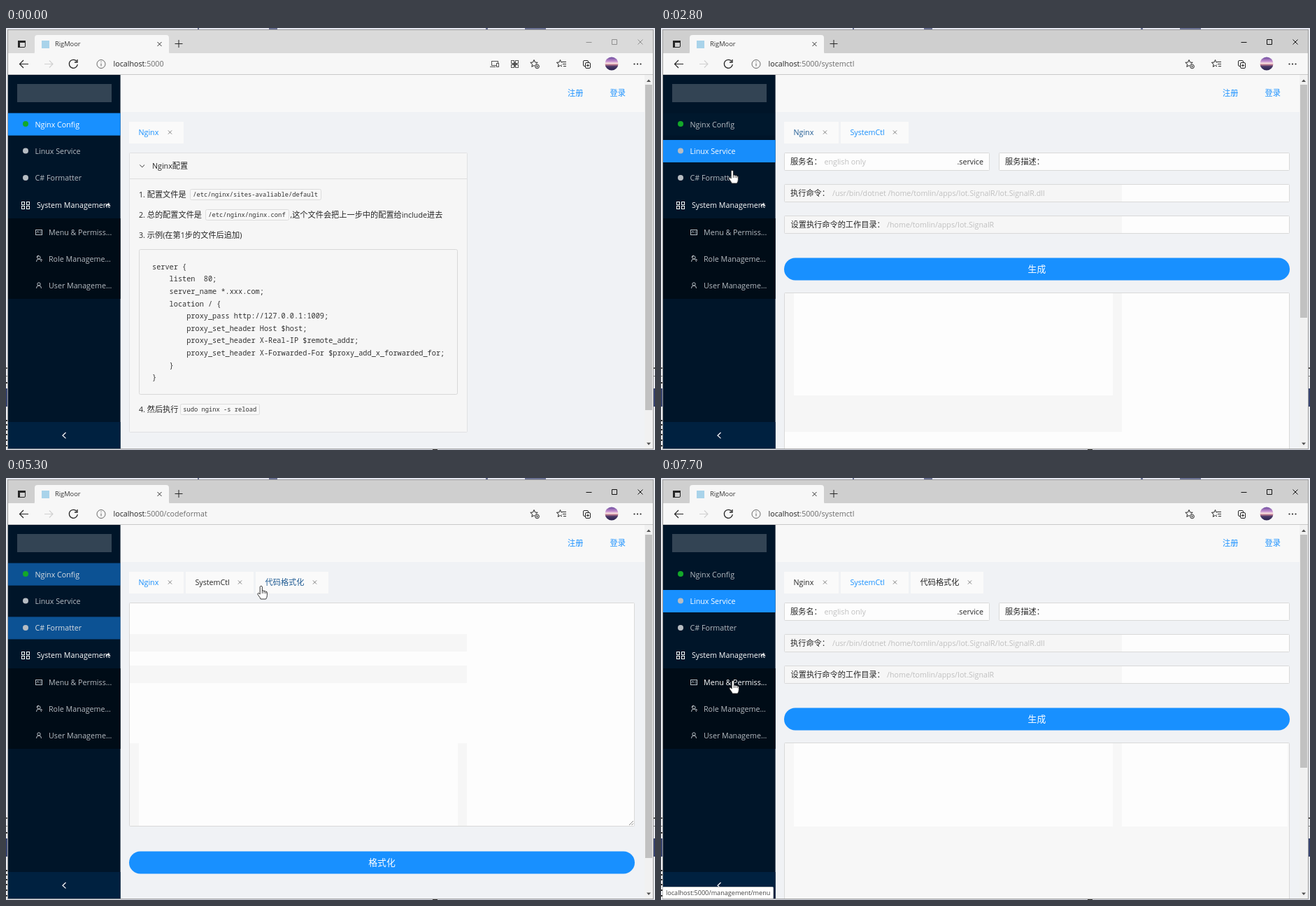
Animation, 928 px wide and 603 px high, one loop 8 s. Source, as an HTML page:

```html
<!DOCTYPE html>
<html lang="zh">
<head>
<meta charset="utf-8">
<title>RigMoor</title>
<style>
html, body { margin: 0; width: 100%; height: 100%; overflow: hidden; background: #e9ebf0; }
svg { display: block; width: 928px; height: 603px; }
text { font-family: 'Open Sans', 'Noto Sans CJK SC', 'Noto Sans CJK', sans-serif; }
.mono { font-family: 'Noto Sans Mono', monospace; }
</style>
</head>
<body>
<svg id="stage" viewBox="0 0 928 603" xmlns="http://www.w3.org/2000/svg"></svg>
<script>
const LOOP = 8000, STEP = 100, FADE = 300;
const BLUE = [24, 144, 255], INK = [38, 38, 38], DIM = [182, 188, 194], WHITE = [255, 255, 255];
const BLUE_HEX = '#1890ff', INK_HEX = '#262626', DIM_HEX = '#b6bcc2';

// --- drawing helpers ---
const esc = s => s.replace(/&/g, '&amp;').replace(/</g, '&lt;');
const rect = (x, y, w, h, fill, extra = '') =>
  `<rect x="${x}" y="${y}" width="${w}" height="${h}" fill="${fill}" ${extra}/>`;
const frame = (x, y, w, h, fill, stroke = '#d9d9d9', r = 1) =>
  rect(x + .5, y + .5, w - 1, h - 1, fill, `stroke="${stroke}" rx="${r}"`);
const line = (d, color = INK_HEX, w = 1, extra = '') =>
  `<path d="${d}" fill="none" stroke="${color}" stroke-width="${w}" ${extra}/>`;
const disc = (x, y, r, fill) => `<circle cx="${x}" cy="${y}" r="${r}" fill="${fill}"/>`;
const ring = (x, y, r, color) => `<circle cx="${x}" cy="${y}" r="${r}" fill="none" stroke="${color}"/>`;
const group = (id, body, extra = '') => `<g id="${id}" ${extra}>${body}</g>`;
// Text is placed by its vertical middle on a whole-pixel baseline; Chinese runs are set slightly larger.
const text = (x, cy, s, fill = INK_HEX, size = 10.7, extra = '') => {
  const body = esc(s).replace(/[\u3000-\u9fff\uff00-\uffef]+/g,
    m => `<tspan font-size="${(size * 1.047).toFixed(2)}">${m}</tspan>`);
  return `<text x="${x}" y="${Math.round(cy + size * .365)}" font-size="${size}" fill="${fill}" ${extra}>${body}</text>`;
};
const mono = (x, cy, s, size) => text(x, cy, s, '#333', size, 'class="mono"');
const cross = (x, y, r, color, w = 1) =>
  line(`M${x - r} ${y - r}l${2 * r} ${2 * r}m0 ${-2 * r}l${-2 * r} ${2 * r}`, color, w);

const star = (x, y, r) => {
  let d = '';
  for (let i = 0; i < 10; i++) {
    const a = -Math.PI / 2 + i * Math.PI / 5, q = i % 2 ? r * .45 : r;
    d += (i ? 'L' : 'M') + (x + q * Math.cos(a)).toFixed(1) + ' ' + (y + q * Math.sin(a)).toFixed(1);
  }
  return line(d + 'Z', INK_HEX, 1, 'stroke-linejoin="round"');
};

// --- browser window ---
function desktop() {
  return rect(0, 0, 928, 603, '#e9ebf0') + rect(0, 0, 928, 2, '#e4e6f0') +
    [[274, 2], [376, 12], [686, 3], [742, 30]].map(([x, w]) => rect(x, 0, w, 2, '#6c7395')).join('') +
    [0, 926].map(x => rect(x, 515, 3, 26, '#3a4672') + rect(x, 485, 3, 2, '#555') + rect(x, 497, 3, 1, '#777')).join('') +
    [506, 560, 566, 573, 580, 588, 596].map(y => rect(0, y, 2, 2, '#333')).join('');
}

function chrome() {
  const collect = rect(825.5, 46.5, 7, 8, 'none', `stroke="${INK_HEX}" rx="1.5"`) +
    rect(828.5, 49.5, 7, 8, '#f7f7f7', `stroke="${INK_HEX}" rx="1.5"`) + line('M830 53.5h4m-2 -2v4');
  return rect(2, 2, 924, 600, '#9c9c9c') + rect(3, 3, 922, 34, '#cfcfcf', 'id="titleBar"') +
    rect(3, 36, 922, 31, '#f7f7f7') + '<path d="M38 37Q41 37 41 34V14Q41 10 45 10H229Q233 10 233 14V34Q233 37 236 37Z" fill="#f7f7f7"/>' +
    rect(17.5, 18.5, 10, 9, 'none', `stroke="${INK_HEX}" rx="1.5"`) + rect(17, 18, 11, 3, INK_HEX) + rect(17, 18, 3, 10, INK_HEX) +
    rect(51, 18, 11, 11, '#a9d3ea') + text(70, 23, 'RigMoor', '#333', 9.3) + cross(219.5, 23, 3, '#333') +
    line('M241.5 22.5h11m-5.5 -5.5v11') +
    line('M32 51.5H19.5m5.5 -5.5l-5.5 5.5l5.5 5.5', INK_HEX, 1.2) +
    line('M55 51.5h12m-5 -5l5 5l-5 5', '#d0d0d0', 1.1) +
    line('M101 47.5a6 6 0 1 0 1.3 4.5M102 45v4h-4', INK_HEX, 1.3) +
    ring(136, 51.5, 6, '#666') + line('M136 50.5v4M136 47.7v1.3', '#666') +
    star(755, 51, 5.5) + disc(759.5, 55, 3.5, '#f7f7f7') + ring(759.5, 55, 2.8, INK_HEX) + line('M758 55h3m-1.5 -1.5v3', INK_HEX, .7) +
    star(792.5, 51, 5.5) + rect(795, 47, 7, 9, '#f7f7f7') + line('M795 48.5h6m-5 3h5m-4 3h4') + collect +
    '<circle cx="866" cy="51" r="9.5" fill="url(#sky)"/>' +
    [898.5, 903, 907.5].map(x => disc(x, 51.5, 1.1, INK_HEX)).join('') +
    group('sideIcons', rect(694.5, 47.5, 9, 6, 'none', 'stroke="#555"') + line('M692 55.5h8', '#555') +
      rect(701.5, 50.5, 3, 5, '#f7f7f7', 'stroke="#555"') +
      [722, 728].map(x => [46, 52].map(y => rect(x + .5, y + .5, 4, 4, 'none', 'stroke="#555"')).join('')).join('') + line('M724 51.5h7m-3.5 -3v7', '#555')) +
    group('winButtons', '<path d="M829.5 20.5h8M866.5 16.5h7v7h-7ZM903.5 16.5l7 7m0 -7l-7 7" fill="none"/>') +
    '<text x="153.5" y="55" font-size="10.7" fill="#222">localhost<tspan fill="#6b6b6b" id="path"></tspan></text>' +
    rect(3, 66, 922, 1, '#c9c9c9');
}

const MENU = [['Nginx Config', 121.6], ['Linux Service', 160], ['C# Formatter', 198.4]];
const SUB = ['Menu & Permiss...', 'Role Manageme...', 'User Manageme...'];

function sidebar() {
  const items = MENU.map(([label, y], i) =>
    rect(3, y, 160.6, 32, BLUE_HEX, `id="bg${i}" opacity="0"`) +
    disc(28, y + 15.5, 4, i ? DIM_HEX : '#13a829') +
    text(41.5, y + 16, label, DIM_HEX, 10.7, `id="item${i}"`)).join('');
  const person = (y, role) => ring(47, y - 2, 2.2, DIM_HEX) + line(`M43.5 ${y + 4}q0 -4 3.5 -4t3.5 4`, DIM_HEX) +
    (role ? line(`M44 ${y - 2}q0 -3 3 -3M50 ${y}l2 2`, DIM_HEX) : '');
  return rect(3, 67, 160.6, 535, '#001529') + rect(16, 80, 135, 26, '#334454') + items +
    rect(3, 272, 160.6, 115, '#000c17') +
    [22.5, 29.5].map(x => [248.5, 254.5].map(y => rect(x, y, 4, 4, 'none', 'stroke="#fff"')).join('')).join('') +
    text(44, 253, 'System Management', '#fff') + line('M142.5 254.5l3.3 -2.8l3.3 2.8', '#fff', 1.3) +
    rect(42.5, 288.5, 9, 7, 'none', `stroke="${DIM_HEX}"`) + line('M44 293l1.5 -3l1.5 3M48.5 291h2m-2 2h2', DIM_HEX, .8) +
    person(330, true) + person(368, false) +
    SUB.map((s, i) => text(61, 291.7 + i * 38.4, s, DIM_HEX, 10.7, `id="sub${i}"`)).join('') +
    rect(3, 563, 160.6, 38, '#002140') + line('M85.5 578l-4.5 4.2l4.5 4.2', '#fff', 1.2);
}

function main() {
  return rect(163, 67, 750, 534, '#f0f2f5') + rect(163, 67, 750, 53, '#f8f8f8') +
    text(803, 93, '注册', BLUE_HEX) + text(863.5, 93, '登录', BLUE_HEX) +
    rect(913, 67, 12, 534, '#f1f1f1') + rect(914, 81, 10, 465, '#c1c1c1', 'id="thumb"') +
    '<path d="M916 77l3 -3.5l3 3.5ZM916 592.5l3 3.5l3 -3.5Z" fill="#505050"/>';
}

const TABS = [['Nginx', 176, 78, 0], ['SystemCtl', 257, 97, 2550], ['代码格式化', 357, 104, 3200]];
const tabs = () => TABS.map(([s, x, w], i) => group('tab' + i,
  rect(x, 134, w, 31, '#fafafa') + text(x + 13.5, 149, s, INK_HEX, 10.7, `id="label${i}"`) +
  cross(x + w - 19.5, 149, 2.6, '#777', .9))).join('');

// --- pages ---
const CODE = [[0, 'server {'], [1, 'listen  80;'], [1, 'server_name *.xxx.com;'], [1, 'location / {'],
  [2, 'proxy_pass http://127.0.0.1:1009;'], [2, 'proxy_set_header Host $host;'],
  [2, 'proxy_set_header X-Real-IP $remote_addr;'],
  [2, 'proxy_set_header X-Forwarded-For $proxy_add_x_forwarded_for;'], [1, '}'], [0, '}']];

function nginxPage() {
  const chip = (x, y, w, s) => frame(x, y, w, 16, '#f8f8f8', '#dcdcdc', 2) + mono(x + 4.2, y + 8.2, s, 8.78);
  return frame(176, 178, 484, 400, '#f6f6f6', '#e0e1e3') + line('M177 215.5h482', '#dedede') +
    line('M191.3 195.5l3.4 3.4l3.4 -3.4', '#333') + text(209, 197, 'Nginx配置') +
    text(190, 238, '1. 配置文件是') + chip(263, 230, 188, '/etc/nginx/sites-avaliable/default') +
    text(190, 267, '2. 总的配置文件是') + chip(285, 259, 120, '/etc/nginx/nginx.conf') +
    text(406.5, 267, ',这个文件会把上一步中的配置给include进去') +
    text(190, 296, '3. 示例(在第1步的文件后追加)') + frame(190, 316, 456, 208, '#f6f6f6', '#d8d8d8', 2) +
    CODE.map(([n, s], i) => mono(209 + n * 24.6, 341 + i * 17.6, s, 10.26).replace('<text', '<text xml:space="preserve"')).join('') +
    text(190, 545, '4. 然后执行') + chip(249, 537, 114, 'sudo nginx -s reload');
}

const button = (y, s) => rect(176, y, 723, 32, BLUE_HEX, 'rx="16"') + text(537.5, y + 16, s, '#fff', 12.3, 'text-anchor="middle"');

function servicePage() {
  const hint = '#bfbfbf', tint = y => rect(177, y, 482, 24, '#f6f6f6');
  return frame(176, 178, 294, 26, '#fdfdfd') + text(185, 191, '服务名：') + text(233.5, 191, 'english only', hint) +
    text(423.5, 191, '.service') + frame(483, 178, 416, 26, '#fdfdfd') + text(492, 191, '服务描述：') +
    frame(176, 223, 723, 26, '#fdfdfd') + tint(224) + text(185, 236, '执行命令：') +
    text(245, 236, '/usr/bin/dotnet /home/tomlin/apps/Iot.SignalR/Iot.SignalR.dll', hint) +
    frame(176, 268, 723, 26, '#fdfdfd') + tint(269) + text(185.5, 281, '设置执行命令的工作目录：') +
    text(323, 281, '/home/tomlin/apps/Iot.SignalR', hint) + button(328.5, '生成') +
    frame(176, 378, 723, 240, '#fdfdfd') +
    group('shadeA', rect(177, 379, 482, 198, '#f6f6f6') + rect(190, 379, 456, 146, '#fdfdfd')) +
    group('shadeB', rect(177, 379, 721, 230, '#f7f7f7') + rect(190, 379, 456, 119, '#fdfdfd') + rect(659, 379, 237, 119, '#fdfdfd'));
}

function formatPage() {
  return frame(176, 178, 723, 320, '#fdfdfd') +
    rect(177, 223, 482, 25, '#f6f6f6') + rect(177, 268, 482, 25, '#f6f6f6') +
    rect(177, 379, 13, 118, '#f6f6f6') + rect(646, 379, 13, 118, '#f6f6f6') +
    line('M891 496l6 -6m-2.5 6l2.5 -2.5', '#888') + button(533.5, '格式化');
}

const HAND = '<path d="M-1.8 9V.8Q-1.8 -.6 -.2 -.6Q1.4 -.6 1.4 .8V6.2Q2.8 5.4 4 6.6Q5.5 6 6.4 7.3Q8.4 6.9 8.4 9V12.4Q8.4 15.5 6.6 18H-.8Q-1.8 15.4 -4.4 12.4Q-5.8 10.4 -4.6 9.6Q-3.2 9 -1.8 11Z" fill="#fff" stroke="#222" stroke-width=".9"/>' +
  line('M1.4 6v4M4 6.8v3.2M6.4 7.5v2.7', '#222', .8);
const ARROW = '<path d="M0 0V15L3.4 11.8L5.7 17L8 16L5.8 11H10.5Z" fill="#fff" stroke="#222" stroke-width=".9"/>';

const stage = document.getElementById('stage');
stage.innerHTML = '<defs><linearGradient id="sky" x2="0" y2="1"><stop stop-color="#6a4a9c"/>' +
  '<stop offset=".32" stop-color="#c58fd0"/><stop offset=".48" stop-color="#fbe3e0"/><stop offset=".58" stop-color="#b9788f"/>' +
  '<stop offset=".7" stop-color="#4a3868"/><stop offset="1" stop-color="#2b2350"/></linearGradient></defs>' +
  desktop() + chrome() + main() + sidebar() + tabs() +
  group('page0', nginxPage()) + group('page1', servicePage()) + group('page2', formatPage()) +
  group('status', rect(2.5, 584.5, 158, 17, '#fff', 'id="statusBox" stroke="#c4c4c4" rx="1"') + text(7, 593, '', '#444', 9.1, 'id="statusText"')) +
  rect(2, 601, 924, 1, '#9c9c9c') + rect(0, 602, 928, 1, '#d4d7e2') + rect(610, 602, 7, 1, '#333') +
  group('hand', HAND) + group('arrow', ARROW);

const el = {};
stage.querySelectorAll('[id]').forEach(n => el[n.id] = n);

// --- timeline ---
const PAGES = [[0, 0], [2550, 1], [3200, 2], [4100, 1], [4550, 0], [5150, 2], [5700, 1]];
const PATHS = [[0, ''], [1200, '/systemctl'], [2900, '/codeformat'], [4100, '/systemctl'], [4550, ''], [5150, '/codeformat'], [5700, '/systemctl']];
const STATUS = [[0, ''], [1000, 'systemctl'], [1200, ''], [7700, 'management/menu']];
const MOVES = [[300, 860, 43], [600, 520, 150], [900, 150, 190], [1100, 93, 177], [2500, 93, 177], [2800, 102, 204],
  [3000, 100, 211], [3400, 100, 211], [3900, 290, 147], [4100, 290, 147], [4300, 236, 152], [4450, 208, 150],
  [4800, 208, 150], [5100, 365, 155], [5300, 365, 155], [5600, 298, 150], [5800, 298, 150], [6500, 98, 254],
  [6800, 98, 254], [7500, 103, 290]];
const THUMB_END = [546, 414, 543];
const ACTIVE_AT = 1200;

const last = (table, t) => table.reduce((k, row, i) => row[0] <= t ? i : k, 0);
const ease = p => { p = Math.min(1, Math.max(0, p)); return p < .5 ? 4 * p ** 3 : 1 - (2 - 2 * p) ** 3 / 2; };
const mix = (a, b, p) => `rgb(${a.map((v, i) => Math.round(v + (b[i] - v) * p))})`;
const show = (node, on) => node.setAttribute('visibility', on ? 'visible' : 'hidden');

function pointer(t) {
  const i = last(MOVES, t), a = MOVES[i], b = MOVES[i + 1] || a;
  let p = b === a ? 0 : (t - a[0]) / (b[0] - a[0]);
  p = p * p * (3 - 2 * p);
  return [a[1] + (b[1] - a[1]) * p, a[2] + (b[2] - a[2]) * p];
}

function render(now) {
  const t = Math.floor(now % LOOP / STEP) * STEP;
  const k = last(PAGES, t), [since, cur] = PAGES[k], prev = k ? PAGES[k - 1][1] : -1;
  const fadeIn = k ? ease((t - since) / FADE) : 1;
  const fadeOut = 1 - ease((t - since - 100) / FADE);
  const [x, y] = pointer(t), seen = t >= 300;

  MENU.forEach(([, top], i) => {
    const on = i === cur ? fadeIn : i === prev ? 1 - fadeIn : 0;
    const hover = seen && x < 163 && y >= top + 8 && y < top + 32;
    el['bg' + i].setAttribute('opacity', on);
    el['item' + i].setAttribute('fill', mix(DIM, WHITE, hover ? 1 : on));
  });
  TABS.forEach(([, , , born], i) => {
    const on = i === cur ? fadeIn : i === prev ? fadeOut : 0;
    show(el['tab' + i], t >= born);
    el['label' + i].setAttribute('fill', mix(INK, BLUE, on));
  });
  for (let i = 0; i < 3; i++) show(el['page' + i], i === cur);
  show(el.shadeA, cur === 1 && t < 3200);
  show(el.shadeB, cur === 1 && t >= 3200);
  el.thumb.setAttribute('height', THUMB_END[cur] - 81);
  el.sub0.setAttribute('fill', t >= 7400 ? '#fff' : DIM_HEX);

  const active = t >= ACTIVE_AT;
  el.path.textContent = ':5000' + PATHS[last(PATHS, t)][1];
  show(el.sideIcons, !active);
  el.titleBar.setAttribute('fill', active ? '#cfcfcf' : '#dadada');
  el.winButtons.setAttribute('stroke', active ? '#111' : '#8f8f8f');

  const tip = STATUS[last(STATUS, t)][1];
  show(el.status, tip);
  el.statusText.textContent = 'localhost:5000/' + tip;
  el.statusBox.setAttribute('width', tip === 'systemctl' ? 114 : 158);

  const link = x < 163 || (y > 133 && y < 166 && x > 176 && x < 461);
  for (const [name, on] of [['hand', link], ['arrow', !link]]) {
    show(el[name], seen && on);
    el[name].setAttribute('transform', `translate(${x.toFixed(1)} ${y.toFixed(1)})`);
  }
}

const start = performance.now();
(function tick() {
  render(performance.now() - start);
  requestAnimationFrame(tick);
})();
</script>
</body>
</html>
```
